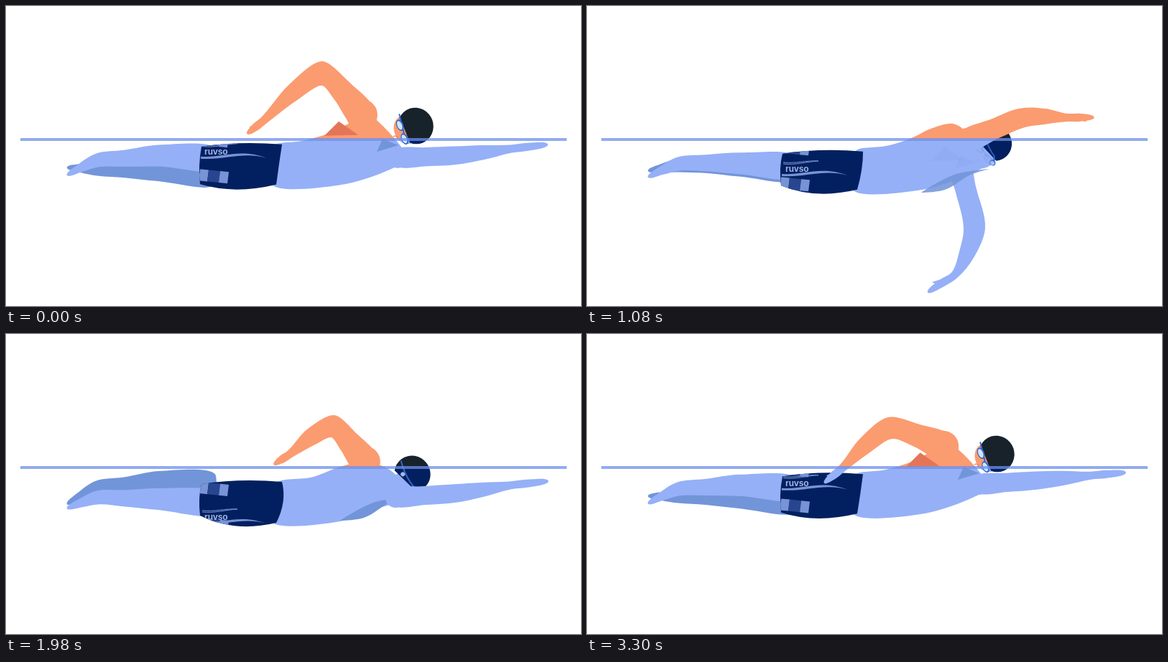
Recreate the animation shown at these times as an HTML page with a canvas. Size 800 px wide and 418 px high, loop 3420 ms.

```html
<!DOCTYPE html>
<html lang="en">
<head>
<meta charset="utf-8">
<title>Front crawl</title>
<style>
html, body { margin: 0; width: 100%; height: 100%; overflow: hidden; background: #fff; }
canvas { display: block; width: 100vw; height: 100vh; }
</style>
</head>
<body>
<canvas id="stage" width="800" height="418"></canvas>
<script>
const ctx = document.getElementById('stage').getContext('2d');
const LOOP = 3420, STEP = 60, WATER = 186;
const AIR = { skin: '#fb9b70', shade: '#e57558', cap: '#17222b' };
const SEA = { skin: '#95b0f7', shade: '#7295d9', cap: '#02205f' };
const NAVY = '#02205f', PALE = '#a4b7ea', SOFT = '#7893d6', RIM = '#3566cc';

// Torso rolled towards the viewer and away
const OPEN = [372,193, 412,186, 445,177, 475,163, 502,150, 527,169, 558,213, 537,225, 462,248, 370,247];
const CLOSED = [375,208, 428,199, 459,187, 487,180, 521,183, 541,195, 560,226, 518,243, 465,261, 370,262];

// One stroke, shared by both arms: time, elbow, wrist
const STROKE = [
  [0, 440,94, 358,160],
  [310, 455,99, 395,138],
  [540, 507,75, 503,112],
  [780, 547,109, 576,104],
  [1210, 625,175, 699,178],
  [1440, 625,200, 696,198],
  [1680, 625,220, 703,211],
  [1980, 625,222, 701,211],
  [2460, 623,234, 705,262],
  [2700, 560,300, 535,365],
  [2880, 455,290, 448,338],
  [3140, 415,222, 370,246],
  [3300, 422,131, 354,188]
];

const mix = (a, b, k) => a + (b - a) * k;
const mixPt = (a, b, k) => a.map((v, i) => mix(v, b[i], k));
const wave = (t, peak) => Math.cos((t - peak) / LOOP * Math.PI * 2);
const bump = (t, mid, span) => Math.exp(-(((t - mid) / span) ** 2));
const clamp = x => Math.min(1, Math.max(0, x));
const ease = x => x * x * (3 - 2 * x);

// Cyclic cubic interpolation through timed rows
function along(rows, t) {
  const n = rows.length;
  let i = n - 1;
  while (rows[i][0] > t) i--;
  const row = j => rows[(j + n) % n];
  const time = j => row(j)[0] + Math.floor(j / n) * LOOP;
  const h = time(i + 1) - time(i), u = (t - time(i)) / h;
  const b = u * (1 - u) ** 2 * h, c = u * u * (u - 1) * h;
  const d0 = time(i + 1) - time(i - 1), d1 = time(i + 2) - time(i);
  return row(i).slice(1).map((p, k) => {
    const q = row(i + 1)[k + 1];
    return mix(p, q, ease(u)) + b * (q - row(i - 1)[k + 1]) / d0 + c * (row(i + 2)[k + 1] - p) / d1;
  });
}

function pairs(v) {
  const out = [];
  for (let i = 0; i < v.length; i += 2) out.push([v[i], v[i + 1]]);
  return out;
}

// Closed curve through points; sharp turns stay pointed
function smooth(pts, color) {
  const n = pts.length;
  const knots = pts.map((p, i) => {
    const a = pts[(i + n - 1) % n], b = pts[(i + 1) % n];
    const l0 = Math.hypot(p[0] - a[0], p[1] - a[1]) || 1;
    const l1 = Math.hypot(b[0] - p[0], b[1] - p[1]) || 1;
    const ux = (p[0] - a[0]) / l0, uy = (p[1] - a[1]) / l0;
    const vx = (b[0] - p[0]) / l1, vy = (b[1] - p[1]) / l1;
    const k = 0.17 * (1 + ux * vx + uy * vy) / (Math.hypot(ux + vx, uy + vy) || 1);
    return { x: (ux + vx) * k, y: (uy + vy) * k, l0, l1 };
  });
  ctx.beginPath();
  ctx.moveTo(...pts[0]);
  for (let i = 0; i < n; i++) {
    const j = (i + 1) % n, p = pts[i], q = pts[j], a = knots[i], b = knots[j];
    ctx.bezierCurveTo(p[0] + a.x * a.l1, p[1] + a.y * a.l1,
      q[0] - b.x * b.l0, q[1] - b.y * b.l0, q[0], q[1]);
  }
  ctx.fillStyle = color;
  ctx.fill();
}

function poly(v, color) {
  ctx.beginPath();
  pairs(v).forEach(p => ctx.lineTo(...p));
  ctx.fillStyle = color;
  ctx.fill();
}

function oval(x, y, rx, ry, color) {
  ctx.beginPath();
  ctx.ellipse(x, y, rx, ry, 0, 0, 7);
  ctx.fillStyle = color;
  ctx.fill();
}

function line(color, width, draw) {
  ctx.beginPath();
  draw();
  ctx.strokeStyle = color;
  ctx.lineWidth = width;
  ctx.stroke();
}

function faded(alpha, draw) {
  if (alpha <= 0.01) return;
  ctx.save();
  ctx.globalAlpha = Math.min(1, alpha);
  draw();
  ctx.restore();
}

// Tapered shape around a centre line
function limb(pts, half, color) {
  const left = [], right = [], last = pts.length - 1;
  pts.forEach((p, i) => {
    const a = pts[Math.max(0, i - 1)], b = pts[Math.min(last, i + 1)];
    const angle = Math.atan2(b[1] - a[1], b[0] - a[0]);
    const nx = -Math.sin(angle) * half[i], ny = Math.cos(angle) * half[i];
    left.push([p[0] + nx, p[1] + ny]);
    right.unshift([p[0] - nx, p[1] - ny]);
  });
  smooth([...left, ...right], color);
}

function armPose(t, far) {
  const base = far ? (t + LOOP / 2) % LOOP : t;
  const p = far ? (base + 60 * wave(base, 750) + LOOP) % LOOP : base;
  const [ex, ey, wx, wy] = along(STROKE, p);
  const drop = far ? 8 + 22 * wave(p, 200) : 0;
  const angle = Math.atan2(wy - ey, wx - ex) + .7 * bump(p, 2600, 350);
  const reach = 40 - 14 * wave(p, 350);
  const pts = [
    [520 - 25 * wave(p, 0), 188 - 40 * wave(p, 237)],
    [ex, ey], [wx, wy],
    [wx + reach * Math.cos(angle), wy + reach * Math.sin(angle)]
  ];
  return { p, pts: pts.map(([x, y]) => [x, y + drop]) };
}

function arm({ p, pts: [s, e, w, f] }, color, pal) {
  const raised = wave(p, 150), fold = bump(p, 780, 130);
  const r = 18 + 4 * raised;
  const centre = mixPt(s, w, .5);
  const bow = (m, k) => m.map((v, i) => v + k * (e[i] - centre[i]));
  const bend = Math.hypot(e[0] - centre[0], e[1] - centre[1]);
  const wrist = 5.5 + 6 * fold;
  oval(s[0], s[1], r, r, color);
  limb(
    [s, bow(mixPt(s, e, .5), .06), e, bow(mixPt(e, w, .5), .12), w, mixPt(w, f, .45), f],
    [r * .85, 14.5 + 1.5 * raised, 12.5 + bend * .07, 11 + raised, wrist, wrist, 1],
    color
  );
  // Spread thumb, and the palm in shade when the hand comes forward
  const hx = f[0] - w[0], hy = f[1] - w[1], open = .2 * (1 - bump(p, 1750, 500));
  poly([w[0], w[1], w[0] + hx * .72 - hy * open, w[1] + hy * .72 + hx * open,
    w[0] + hx * .6, w[1] + hy * .6], color);
  faded(fold, () => poly([w[0] - 8, w[1] + 12, f[0], f[1] + 3, f[0] - 10, f[1] + 16], pal.shade));
}

function leg(level, toe, sag, color) {
  const ankle = 228 - 14 * level;
  limb(
    [[290, 236 - 26 * level + sag], [212, 230 - 24 * level + sag], [165, 229 - 18 * level],
      [127, ankle], [104, (ankle + toe) / 2], [85, toe]],
    [15, 15, 11.5, 9.5, 6, 1],
    color
  );
}

function trunks(roll, sag) {
  const away = 1 - roll, top = 16 * away + 6 * sag, low = 16 * away + 2 * sag;
  const left = 248 + 5 * away;
  ctx.save();
  ctx.beginPath();
  ctx.moveTo(272, 193 + top);
  ctx.quadraticCurveTo(325, 185 + top, 384, 190 + top);
  ctx.quadraticCurveTo(379 + 12 * away, 218 + low, 376, 247 + low);
  ctx.quadraticCurveTo(318, 261 + low, 270, left);
  ctx.quadraticCurveTo(267, left - 25, 272, 193 + top);
  ctx.fillStyle = NAVY;
  ctx.fill();
  ctx.clip();
  const panel = mix(266, 235, roll);
  for (const y of [panel, panel - 50]) {
    [[270, 12, SOFT], [282, 16, '#28468f'], [298, 12, SOFT]].forEach(([x, w, color]) => {
      const a = y + (x - 290) * .1, b = a + w * .1;
      poly([x, a - 8, x + w, b - 8, x + w - 2, b + 8, x - 2, a + 8], color);
    });
  }
  ctx.translate(0, mix(254, 196, roll) + 5 * sag);
  for (const y of [-9, -7]) {
    line(SOFT, 1, () => {
      ctx.moveTo(273, y + 1);
      ctx.bezierCurveTo(290, y + 3, 305, y - 2, 322, -10);
    });
  }
  ctx.beginPath();
  ctx.moveTo(271, 8);
  ctx.bezierCurveTo(298, 11, 325, -4, 362, 10);
  ctx.bezierCurveTo(330, 1, 305, 13, 271, 11);
  ctx.fillStyle = SOFT;
  ctx.fill();
  ctx.fillStyle = PALE;
  ctx.font = 'bold 12px "Liberation Sans", Arial, sans-serif';
  ctx.fillText('ruvso', 276, 5);
  ctx.restore();
}

function lens(x, y) {
  oval(x, y, 4.8, 8.2, RIM);
  oval(x + .4, y, 3.2, 6.4, '#cfe8fb');
}

function head(x, y, turn, pal) {
  ctx.save();
  ctx.translate(x, y);
  ctx.rotate(mix(134, 158, turn) * Math.PI / 180);
  oval(mix(22, 15, turn), mix(-2, 0, turn), mix(23, 16, turn), mix(18, 20, turn), pal.skin);
  const open = mix(.95, .85, turn);
  ctx.beginPath();
  ctx.ellipse(0, 0, 24.5, 25.5, 0, open, Math.PI * 2 - open);
  ctx.closePath();
  ctx.fillStyle = pal.cap;
  ctx.fill();
  faded(1 - turn, () => {
    line(RIM, 2, () => {
      ctx.moveTo(-2, 24);
      ctx.quadraticCurveTo(10, 5, 12, -14);
      ctx.lineTo(18, -19);
    });
    oval(10, 9, 3, 3, PALE);
    oval(20, -19, 4, 4.5, RIM);
    oval(20.6, -19, 2.6, 3, '#b9d3fa');
  });
  faded(turn, () => {
    line(RIM, 2, () => {
      ctx.moveTo(15, 24);
      ctx.lineTo(20, -10);
    });
    lens(20, 9);
    lens(21, -11);
    line(pal.shade, 1.2, () => ctx.arc(33, -5, 3, 1, 4));
  });
  ctx.restore();
}

function swimmer(t, pal) {
  const roll = .5 + .5 * wave(t, 300), sag = 4 * roll * (1 - roll);
  const turn = ease(clamp((roll - .5) / .3));
  const near = armPose(t, false), far = armPose(t, true);
  const torso = pairs(mixPt(OPEN, CLOSED, 1 - roll));
  for (const i of [0, 1, 2, 7, 8, 9]) torso[i][1] += 3 * sag;

  arm(far, far.p > 2950 && far.p < 3290 ? pal.shade : pal.skin, pal);
  leg(1 - roll, mix(237, 224, roll), 3 * sag, pal.shade);
  leg(roll, mix(243, 235, roll), 3 * sag, pal.skin);
  smooth(torso, pal.skin);
  faded(1 - turn, () =>
    smooth(pairs([465, 260, 511, 235, 560, 227, 534, 235, 498, 256]), pal.shade));
  trunks(roll, sag);

  const hx = mix(565.5, 570, turn), hy = mix(194.5, 167, turn);
  const [sx, sy] = near.pts[0];
  head(hx, hy, turn, pal);
  faded(turn, () => {
    poly([hx - 46, hy + 18, hx - 24, hy + 27, hx - 54, hy + 36], pal.shade);
    poly([sx - 32, sy + 9, sx - 5, sy + 28, sx - 52, sy + 29], pal.shade);
  });
  arm(near, pal.skin, pal);
  faded(bump(near.p, 780, 130), () =>
    poly([sx - 21, sy + 8, sx + 13, sy - 13, sx + 9, sy + 23], pal.shade));
}

function half(t, pal, top, height) {
  ctx.save();
  ctx.beginPath();
  ctx.rect(0, top, 800, height);
  ctx.clip();
  swimmer(t, pal);
  ctx.restore();
}

function frame(now) {
  const t = Math.min(LOOP - 2 * STEP, Math.floor((now % LOOP) / STEP) * STEP);
  ctx.fillStyle = '#fff';
  ctx.fillRect(0, 0, 800, 418);
  half(t, AIR, 0, WATER);
  half(t, SEA, WATER, 418 - WATER);
  ctx.fillStyle = 'rgba(108,143,236,.75)';
  ctx.fillRect(20, 184, 760, 4);
}

const start = performance.now();
function tick() {
  frame(performance.now() - start);
  requestAnimationFrame(tick);
}
tick();
</script>
</body>
</html>
```
